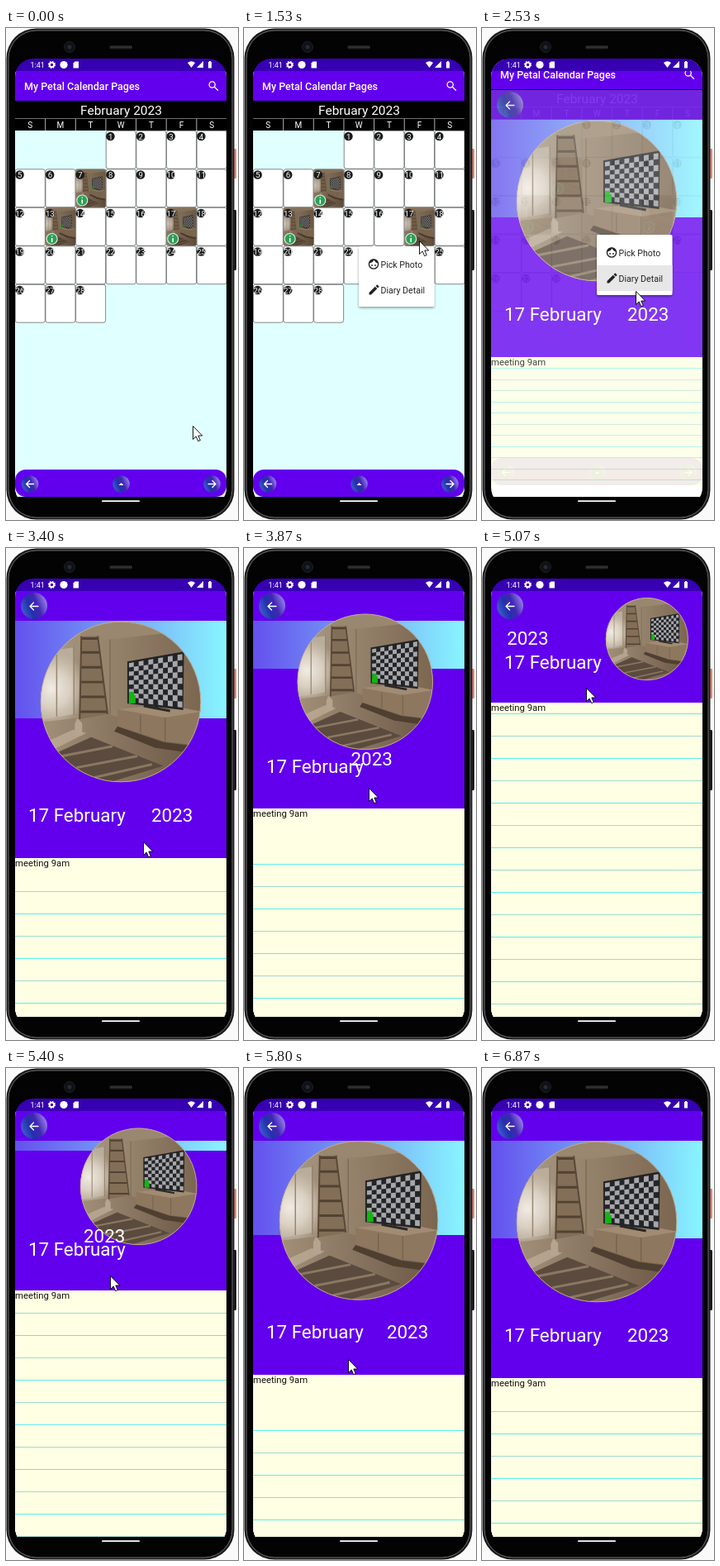
Recreate the animation shown at these times as an HTML page. Size 281x595 px, loop 7340 ms.

```html
<!DOCTYPE html>
<html lang="en">
<head>
<meta charset="utf-8">
<title>Calendar diary demo</title>
<style>
  html, body { margin: 0; width: 100%; height: 100%; overflow: hidden; background: #fafafa; }
  svg { display: block; }
  #stage { width: 281px; height: 595px; }
  text { font-family: Roboto, "Noto Sans", sans-serif; fill: #fff; }
  .mid { text-anchor: middle; }
  .icon { fill: none; stroke: #fff; stroke-width: 1.3; stroke-linecap: round; stroke-linejoin: round; }
  #popup text { fill: #222; font-size: 10.6px; }
  .strong { fill: #5cecee; }
  .pale { fill: #a2d9d0; }
</style>
</head>
<body>
<svg id="stage" viewBox="0 0 281 595">
  <defs>
    <linearGradient id="band"><stop offset="0" stop-color="#6450ee"/><stop offset="1" stop-color="#88f6ff"/></linearGradient>
    <linearGradient id="ball" x1="0" y1=".7" x2="1" y2=".3">
      <stop offset="0" stop-color="#3f62d0"/><stop offset=".35" stop-color="#2430ac"/>
      <stop offset=".62" stop-color="#4126b4"/><stop offset="1" stop-color="#9a86ee"/>
    </linearGradient>
    <linearGradient id="wall"><stop offset="0" stop-color="#ab9c88"/><stop offset=".45" stop-color="#95826b"/><stop offset="1" stop-color="#7b6650"/></linearGradient>
    <radialGradient id="glow"><stop offset="0" stop-color="#f2ece4"/><stop offset=".5" stop-color="#dfd6c9" stop-opacity=".85"/><stop offset="1" stop-color="#cfc3b2" stop-opacity="0"/></radialGradient>
    <linearGradient id="floor"><stop offset="0" stop-color="#a39079"/><stop offset="1" stop-color="#6a5644"/></linearGradient>
    <clipPath id="screen"><rect x="11" y="37" width="256" height="541" rx="22"/></clipPath>
    <clipPath id="window"><rect id="pane" x="11" y="37" width="256" height="530"/></clipPath>
    <clipPath id="round"><circle cx="98" cy="98" r="97.5"/></clipPath>
    <filter id="shade" x="-20%" y="-20%" width="140%" height="150%"><feDropShadow dx="0" dy="1.5" stdDeviation="1.6" flood-opacity=".4"/></filter>
    <symbol id="photo" viewBox="0 0 196 196" preserveAspectRatio="none">
      <rect width="196" height="196" fill="url(#wall)"/>
      <path d="M0 0H196V10L84 22 40 14 0 26Z" fill="#9a8770"/>
      <path d="M0 38 40 32V113L0 120Z" fill="#b9ac9a"/>
      <ellipse cx="14" cy="82" rx="44" ry="46" fill="url(#glow)"/>
      <path d="M20 35V116M41 30V115" stroke="#97866f" stroke-width="1.5"/>
      <path d="M0 123 84 113 196 152V196H0Z" fill="url(#floor)"/>
      <path d="M4 167 62 141 150 176 84 196H40Z" fill="#5b4b3e"/>
      <path d="M26 164 88 152M44 178 118 164M66 190 136 174" stroke="#8b7863" stroke-width="3"/>
      <path d="M0 150 40 132 56 136 0 164Z" fill="#c0b09b" opacity=".7"/>
      <path d="M50 18H70L82 113 48 119Z" fill="#836e57"/>
      <path d="M50 21H70M50 38H73M49 56H75M49 74H77M49 92H79M48 110H81" stroke="#524233" stroke-width="3"/>
      <path d="M50 18 48 119M70 18 82 113" stroke="#5a4837" stroke-width="2"/>
      <path d="M85 22V113" stroke="#7f6c56" stroke-width="1.5"/>
      <path d="M94 128 150 147 196 153V162L140 154 90 134Z" fill="#4f3f31"/>
      <path d="M94 107 150 101 196 110V152L150 146 94 127Z" fill="#8d775f"/>
      <path d="M94 107 150 101 196 110 152 117Z" fill="#a18c73"/>
      <path d="M122 114V136M152 117V146" stroke="#6e5b47"/>
      <path d="M42 139V125L45 118 51 124V139Z" fill="#b5a590"/>
      <path d="M126 103 158 109M142 98V107" stroke="#2b2826" stroke-width="3"/>
      <path d="M106 49 175 37 174 108 106 100Z" fill="#232426"/>
      <path id="checks" fill="#a6a6ab"/>
      <path d="M108 86H114V90H116V100H108Z" fill="#14b414"/>
    </symbol>
  </defs>

  <!-- phone body -->
  <path d="M274 146H278Q279 146 279 148V180Q279 182 278 182H274Z" fill="#e8826e"/>
  <path d="M274 220H278Q279 220 279 222V291Q279 293 278 293H274Z" fill="#1c1c1f"/>
  <rect x=".5" y=".5" width="276" height="594" rx="36" fill="#1b1b1d"/>
  <rect x="3" y="3" width="271" height="589" rx="34" fill="#030303" stroke="#6c6d71"/>
  <circle cx="77" cy="23" r="6.5" fill="#101114" stroke="#1e2023"/>
  <circle cx="77" cy="23" r="2.5" fill="#232b3c"/>
  <rect x="125" y="21" width="28" height="4.5" rx="2" fill="#1e1e20"/>
  <path d="M127 23.2H152" stroke="#444" stroke-width="2" stroke-dasharray="1 1"/>
  <rect x="116" y="571.3" width="46" height="1.7" rx=".8" fill="#fff"/>

  <g clip-path="url(#screen)">
    <rect x="11" y="52" width="256" height="515" fill="#fff"/>
    <g clip-path="url(#window)">
      <g id="month"></g>
      <g id="detail">
        <rect id="veil" x="11" y="52" width="256" height="515" fill="#fff"/>
        <g id="page">
          <rect id="panel" x="11" y="52" width="256" fill="#6200ee"/>
          <rect id="strip" x="11" y="88" width="256" fill="url(#band)"/>
          <g id="portrait">
            <g clip-path="url(#round)"><use href="#photo" width="196" height="196"/></g>
            <circle cx="98" cy="98" r="97.3" fill="none" stroke="#c9b08f" vector-effect="non-scaling-stroke" stroke-width=".9"/>
          </g>
          <circle cx="34" cy="70" r="16" fill="url(#ball)"/>
          <path class="icon" d="M39 70.500H29M33.500 66 29 70.500 33.500 75"/>
          <text id="day" x="27" font-size="22.4">17 February</text>
          <text id="year" font-size="22.4">2023</text>
          <g id="paper">
            <rect x="11" width="256" height="400" fill="#ffffe4"/>
            <g id="rules"></g>
            <text x="11" y="10.300" font-size="11.3" style="fill:#111">meeting 9am</text>
          </g>
        </g>
      </g>
    </g>
    <rect x="11" y="37" width="256" height="15" fill="#3700b3"/>
  </g>

  <!-- status icons -->
  <text x="29.5" y="48" font-size="9">1:41</text>
  <circle cx="55.5" cy="44.5" r="2.7" fill="none" stroke="#fff" stroke-width="2"/>
  <circle cx="55.5" cy="44.5" r="4" fill="none" stroke="#fff" stroke-width="1.3" stroke-dasharray="1.5 1.64"/>
  <circle cx="70" cy="44.5" r="4.6" fill="#fff"/>
  <path d="M83.5 40.5H88V48.5H81.5V42.5Z" fill="#fff"/>
  <path d="M220 42Q224.500 38.500 229 42L224.500 48Z" fill="#fff"/>
  <path d="M239 40V48H231Z" fill="#fff"/>
  <path d="M245 41H246V40H248V41H249V48.500H245Z" fill="#fff"/>

  <g id="popup">
    <rect x="139" y="264" width="91.500" height="73" rx="2" fill="#fff" filter="url(#shade)"/>
    <rect id="press" x="139" y="301" width="91.500" height="31" fill="#e7e7e7"/>
    <circle cx="157" cy="285.500" r="5.600" fill="none" stroke="#222" stroke-width="1.400"/>
    <path d="M151.500 284.500Q156 284 157.500 280.500 159 284 162.500 284.300 161.500 279.500 157 279.500 152 279.800 151.500 284.500Z" fill="#222"/>
    <circle cx="155" cy="287" r=".9" fill="#222"/><circle cx="159" cy="287" r=".9" fill="#222"/>
    <text x="165.500" y="289.500">Pick Photo</text>
    <path d="M151.500 322.500V320L158.800 312.700 161.300 315.200 154 322.500ZM159.500 312 160.800 310.700Q161.300 310.300 161.800 310.700L163.300 312.200Q163.700 312.700 163.300 313.200L162 314.500Z" fill="#222"/>
    <text x="165.500" y="320.500">Diary Detail</text>
  </g>

  <path id="mouse" d="M.5.5V16.500L4.200 13 6.700 18.700 9.300 17.600 6.800 12H11.700Z" fill="#fff" stroke="#000" stroke-width=".9"/>
</svg>

<script>
const LOOP = 7340, STEP = 200 / 3;
const $ = id => document.getElementById(id);
const clamp = v => Math.max(0, Math.min(1, v));
const mix = (a, b, u) => a + (b - a) * u;
const ease = u => (1 - Math.cos(Math.PI * u)) / 2;
const set = (id, attrs) => { for (const k in attrs) $(id).setAttribute(k, attrs[k]); };

// Value of a keyed track [[time, ...values], ...] at time t
function track(keys, t) {
  let i = 0;
  while (i < keys.length - 2 && t >= keys[i + 1][0]) i++;
  const [a, b] = [keys[i], keys[i + 1]];
  const u = ease(clamp((t - a[0]) / (b[0] - a[0])));
  return a.slice(1).map((v, n) => mix(v, b[n + 1], u));
}

const MOUSE = [[0, 226, 481], [840, 214, 253], [900, 214, 252], [1465, 214, 252],
  [1870, 186, 318], [2600, 186, 318], [3130, 181, 323], [3400, 166, 355], [3600, 165, 357],
  [4200, 132, 194], [4400, 131, 192], [4670, 126, 169], [5050, 126, 169],
  [5800, 126, 352], [6600, 66, 566], [6870, 50, 598]];
const FOLD = [[3620, 0], [4200, .83], [4400, .83], [4670, 1], [5050, 1], [5800, .021], [5930, 0]];

function drawChecks() {
  const at = (u, v) => {
    const x = mix(108, 173, u);
    const y = mix(mix(51, 40, u), mix(98, 105, u), v);
    return x.toFixed(1) + " " + y.toFixed(1);
  };
  const cols = 11, rows = 9;
  let d = "";
  for (let r = 0; r < rows; r++) for (let c = r % 2; c < cols; c += 2)
    d += `M${at(c / cols, r / rows)}L${at((c + 1) / cols, r / rows)} ${at((c + 1) / cols, (r + 1) / rows)} ${at(c / cols, (r + 1) / rows)}Z`;
  set("checks", { d });
}

function drawMonth() {
  const w = 256.5 / 7, h = 46.5, top = 124;
  let s = `<rect x="11" y="52" width="256" height="515" fill="#e0ffff"/>
    <rect x="11" y="52" width="256" height="36" fill="#6200ee"/>
    <text x="22" y="75" font-size="12.5" font-weight="500">My Petal Calendar Pages</text>
    <circle class="icon" cx="249.700" cy="68.500" r="3.600"/><path class="icon" d="M252.500 71.300 256.500 75.300"/>
    <rect x="11" y="88" width="256" height="36" fill="#000"/>
    <text class="mid" x="139.500" y="105" font-size="15.500">February 2023</text>
    <path d="M11 109.500H267" stroke="#bbb" stroke-width=".6"/>`;
  [..."SMTWTFS"].forEach((name, c) => {
    const x = 11 + c * w;
    s += `<text class="mid" x="${x + w / 2}" y="120.500" font-size="10">${name}</text>`;
    if (c) s += `<path d="M${x} 110V124" stroke="#ddd" stroke-width=".8"/>`;
  });
  for (let day = 1; day <= 28; day++) {
    const n = day + 2, x = 11 + n % 7 * w, y = top + Math.floor(n / 7) * h;
    const box = `x="${x + .3}" y="${y + .3}" width="${w - .6}" height="${h - .6}"`;
    s += `<rect ${box} rx="2.500" fill="#fff" stroke="#555" stroke-width=".7"/>`;
    if ([7, 13, 17].includes(day)) s += `<use href="#photo" ${box}/>
      <rect ${box} fill="#2a1a0c" opacity=".2"/>
      <circle cx="${x + 8}" cy="${y + 38}" r="6.500" fill="#2f9e57" stroke="#d5efdd" stroke-width="1.200"/>
      <path d="M${x + 8} ${y + 37}V${y + 42}M${x + 8} ${y + 34}V${y + 35.300}" stroke="#fff" stroke-width="1.500"/>`;
    s += `<circle cx="${x + 5.500}" cy="${y + 7}" r="5.300" fill="#1c1c1c"/>
      <text class="mid" x="${x + 5.700}" y="${y + 10.500}" font-size="9.600">${day}</text>`;
  }
  s += `<rect x="11" y="534" width="256" height="33" rx="13" fill="#6200ee"/>`;
  for (const x of [29, 139.500, 249.500]) s += `<circle cx="${x}" cy="551.500" r="10.300" fill="url(#ball)"/>`;
  s += `<path class="icon" d="M33.500 551.500H24.500M28.500 547.500 24.500 551.500 28.500 555.500M245 551.500H254M250 547.500 254 551.500 250 555.500"/>
    <path d="M136.500 553H142.500L139.500 550Z" fill="#fff"/>`;
  $("month").innerHTML = s;
}

// Thin rules alias on the small screen, so only every second one is seen
function drawRules(p, edge, sliding) {
  const even = p > .4 && p < .92;
  const first = sliding || p > .9 ? 1 : even ? 2 : p > 0 ? 5 : 3;
  let s = "";
  for (let k = first; edge + k * 13.5 < 567; k += sliding ? 1 : 2) {
    const y = Math.floor(edge + k * 13.5) - edge;
    const kind = k >> 1 & 1 ? "pale" : "strong";
    s += `<rect class="${kind}" x="11" y="${y}" width="256" height="1" opacity="${sliding ? .6 : 1}"/>`;
  }
  $("rules").innerHTML = s;
}

function drawDetail(t) {
  const p = track(FOLD, t)[0];
  const shown = clamp((t - 2435) / 126);
  const drop = t > 2900 ? 0 : Math.round(23 * Math.exp((2533 - t) / 110));
  const edge = Math.round(mix(375, 187, p));
  set("detail", { transform: `translate(0 ${drop})`, visibility: shown ? "visible" : "hidden" });
  set("veil", { opacity: shown * .85 });
  set("page", { opacity: shown });
  set("panel", { height: edge - 52 });
  set("strip", { height: Math.max(0, edge - 257) });
  set("paper", { transform: `translate(0 ${edge})` });
  const r = mix(97.5, 50, p), cx = mix(139, 200, Math.pow(p, 1.8)), cy = mix(186, 110, p);
  set("portrait", { transform: `translate(${cx - r} ${cy - r}) scale(${r / 98})` });
  set("day", { y: mix(331, 146, p) });
  set("year", { x: mix(176, 30, p), y: mix(331, 117, p) });
  drawRules(p, edge, drop > 0);
}

function render(time) {
  const t = Math.floor((time % LOOP + 4) / STEP) * STEP;
  const lift = -14 * ease(clamp((t - 2400) / 120));
  set("month", { transform: `translate(0 ${lift})`, visibility: t < 2620 ? "visible" : "hidden" });
  set("pane", { height: 530 + (t < 2620 ? lift : 0) });
  drawDetail(t);
  const fade = t < 1260 ? 0 : t < 1325 ? .6 : 1 - clamp((t - 2540) / 150);
  set("popup", { transform: `translate(0 ${lift})`, opacity: fade });
  set("press", { opacity: t >= 2395 ? 1 : 0 });
  const [x, y] = track(MOUSE, t);
  set("mouse", { transform: `translate(${Math.round(x)} ${Math.round(y)})` });
}

drawChecks();
drawMonth();
const start = performance.now();
function tick() {
  render(performance.now() - start);
  requestAnimationFrame(tick);
}
tick();
</script>
</body>
</html>
```
